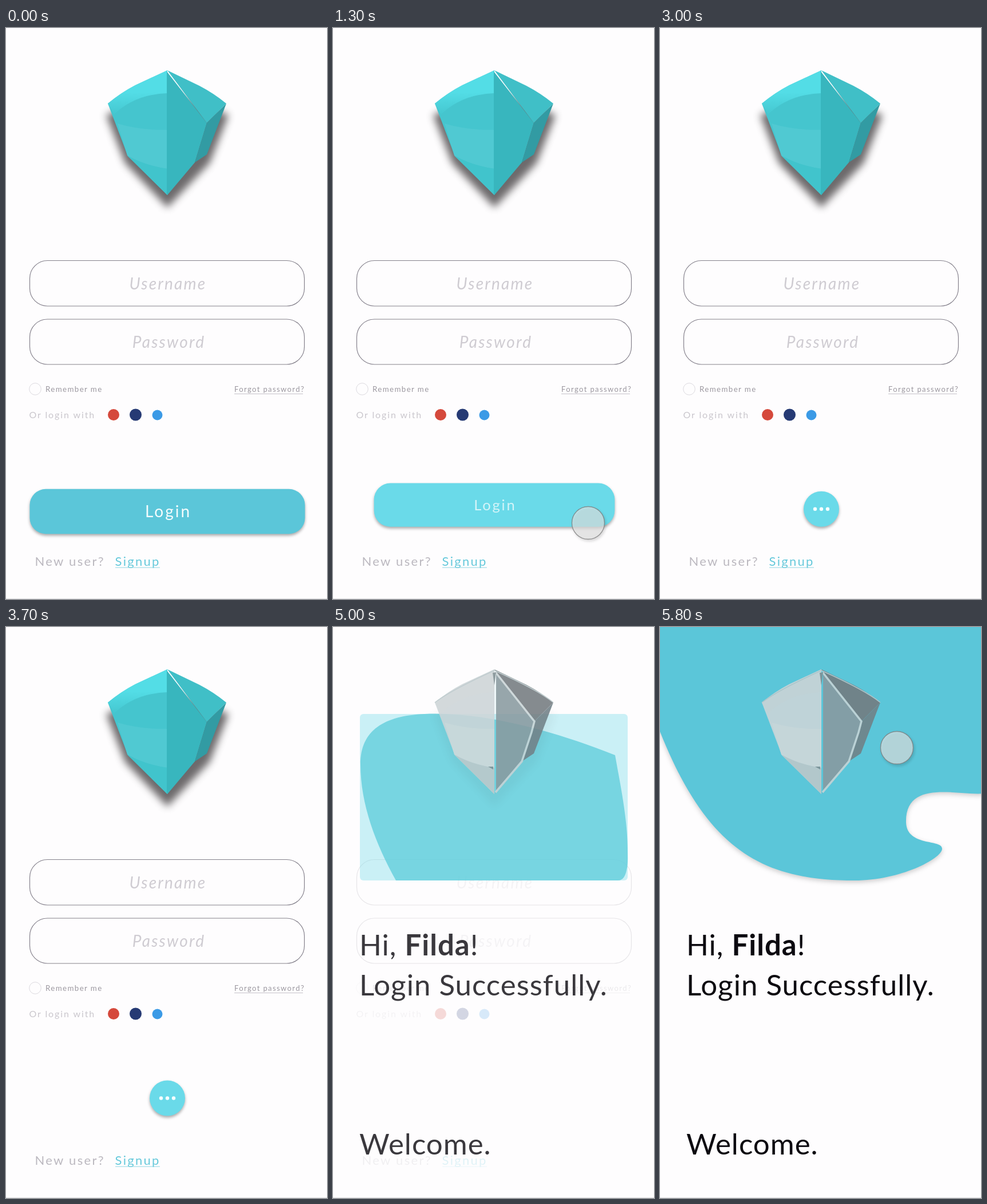
Recreate the animation shown at these times as an HTML page. Size 561 px wide and 998 px high, loop 5900 ms.

```html
<!DOCTYPE html>
<html lang="en">
<head>
<meta charset="utf-8">
<title>Login</title>
<style>
  html, body { margin: 0; width: 100%; height: 100%; overflow: hidden; background: #fefdfe; }
  svg { display: block; width: 100vw; height: 100vh; font-family: Lato, "Open Sans", sans-serif; }
  .field { fill: none; stroke: #85818c; stroke-width: 1.2; }
  .hint { font-size: 28px; font-style: italic; letter-spacing: 2.2px; fill: #cfccd2; text-anchor: middle; }
  .small { font-size: 13.3px; letter-spacing: 1.4px; fill: #9c98a0; }
  .foot { font-size: 22px; letter-spacing: 2.3px; fill: #bbb8bf; }
  .big { font-size: 51px; letter-spacing: 1px; fill: #0c0a10; }
</style>
</head>
<body>
<svg viewBox="0 0 561 998" preserveAspectRatio="none">
  <linearGradient id="crown" x2="0" y2="1">
    <stop offset=".5" stop-color="#53dde6"/><stop offset="1" stop-color="#45c7d0"/>
  </linearGradient>
  <path d="M0 997.5H561" stroke="#e3e2e4"/>
  <g id="form">
    <rect class="field" x="41.5" y="406.5" width="480" height="79.5" rx="31"/>
    <rect class="field" x="41.5" y="509" width="480" height="79" rx="31"/>
    <text class="hint" x="283" y="456.5">Username</text>
    <text class="hint" x="284.5" y="558.5">Password</text>
    <circle cx="51" cy="631" r="10.3" fill="none" stroke="#dddbe0"/>
    <text class="small" x="69" y="636">Remember me</text>
    <text class="small" x="399" y="636" style="font-size:13px">Forgot password?</text>
    <path d="M399 639.5H519" stroke="#c4c1c8"/>
    <text x="40.5" y="681.5" font-size="16" letter-spacing="1.9" fill="#cac7cd">Or login with</text>
    <circle cx="188" cy="676" r="10" fill="#d5493c"/>
    <circle cx="226.5" cy="676" r="10.5" fill="#263a74"/>
    <circle cx="264.5" cy="676.5" r="9" fill="#3b9ae6"/>
    <text class="foot" x="50.5" y="939.5">New user?</text>
    <text class="foot" x="190.5" y="939.5" style="fill:#66c9db">Signup</text>
    <path d="M191 943H269" stroke="#8ed6e2"/>
  </g>
  <rect id="button"/>
  <text id="label" font-size="28" letter-spacing="3" fill="#f4fcfd" text-anchor="middle" x="1.5" y="10">Login</text>
  <g id="dots" fill="#f6feff">
    <circle cx="-11" r="3.2"/><circle r="3.2"/><circle cx="11" r="3.2"/>
  </g>
  <path id="blob"/>
  <g id="gem">
    <path d="M175 152L208 236L282 314L356 236L389 152L282 110Z" fill="#2f2b2d" opacity=".7" style="filter:blur(7px)"/>
  </g>
  <g id="stone"></g>
  <g id="welcome">
    <text class="big" x="46" y="573.5">Hi, <tspan font-weight="700">Filda</tspan>!</text>
    <text class="big" x="46" y="643.5">Login Successfully.</text>
    <text class="big" x="46" y="921.5">Welcome.</text>
  </g>
  <circle id="touch" r="28.5" fill="#e6e6e6" fill-opacity=".65" stroke="#7d7d7d" stroke-opacity=".8"
    stroke-width="1.4" style="filter:drop-shadow(2px 3px 2px #0003)"/>
</svg>
<script>
const LOOP = 5900, $ = id => document.getElementById(id);
const clamp = v => Math.max(0, Math.min(1, v));
const span = (t, a, b) => clamp((t - a) / (b - a));
const mix = (a, b, k) => a + (b - a) * k;
const blend = (a, b, k) => `rgb(${a.map((v, i) => Math.round(mix(v, b[i], k)))})`;
const shadow = (y, blur, alpha) => `filter:drop-shadow(0 ${y}px ${blur}px rgba(0,0,0,${alpha}))`;
const inOut = u => u < .5 ? 2 * u * u : 1 - 2 * (1 - u) ** 2;
const out = u => 1 - (1 - u) ** 3;
const set = (id, attrs) => { for (const k in attrs) $(id).setAttribute(k, attrs[k]); };

const TEAL = [91, 198, 217], BRIGHT = [106, 218, 233], SOFT = [100, 207, 221];

// Facets: left side, its crown, band and foot; right side, its crown and edge
function drawGem(id, seam, colors) {
  const facets = [
    'M282 74L226 100Q201 113 178 132L213 224L282 292Z',
    'M282 74L226 100Q201 113 178 132L189 151Q225 116 282 114Z',
    'M195 167Q235 179 282 178V246Q244 241 212 223Z',
    'M212 223Q244 241 282 246V292Z',
    `M${seam} 76L351 166L330 235L282 292L${seam} 289Z`,
    'M282 74L338 101Q363 114 385 132L351 166Z',
    'M385 132L351 221L330 235L351 166Z'
  ];
  $(id).innerHTML += facets.map((d, i) => `<path d="${d}" fill="${colors[i]}"/>`).join('');
}
drawGem('gem', 281, ['#45c5ce', 'url(#crown)', '#50c9d2', '#41c4cc', '#38b6be', '#40bfc7', '#329ba3']);
drawGem('stone', 285, ['#ced5d8', '#cfd4d6', '#d5d9da', '#bfc8ca', '#89999f', '#747a7e', '#717f85']);
$('stone').innerHTML += `
  <path d="M284 79L352 165L347 184L330 235L284 289" fill="none" stroke="#c9d3d5" stroke-width="3.5"/>
  <path d="M178 132Q205 111 282 76Q360 111 385 132" fill="none" stroke="#b9c6c9" stroke-width="1.5"/>
  <path d="M279 80L285 79L282 102ZM271 244L280 244L280 249Z" fill="#808e92"/>`;

// Two closed outlines with matching cubic segments
const card = [160,152, 250,148,370,175,493,224, 501,270,515,335,515,390, 515,402,516,414,513,425,
  511,435,507,443,498,443, 370,443,240,443,110,443, 75,380,48,310,48,240, 48,180,90,155,160,152];
const wave = [-5,-5, 180,-5,380,-5,566,-5, 566,90,566,200,566,291, 520,295,428,265,430,342,
  432,385,495,370,493,388, 492,405,420,443,340,443, 180,443,80,392,-5,170, -5,100,-5,50,-5,-5];

function drawBlob(x, y, w, h, k, opacity) {
  const p = card.map((v, i) => mix(i % 2 ? y + (v - 152) / 291 * h : x + (v - 47) / 468 * w, wave[i], k));
  set('blob', { d: `M${p.slice(0, 2)}C${p.slice(2)}Z`, opacity,
    fill: blend(SOFT, TEAL, k), style: shadow(3, 4, .2 * k) });
}

function drawTouch(t) {
  let x, y, opacity;
  if (t < 2700) {
    const go = out(span(t, 150, 700)), leave = inOut(span(t, 2250, 2600));
    x = mix(517, 446, go) + 76 * leave;
    y = mix(890, 865, go);
    opacity = span(t, 120, 260) * (1 - span(t, 2450, 2650));
  } else {
    const go = out(span(t, 5450, 5800));
    x = mix(516, 414, go);
    y = mix(240, 211, go);
    opacity = span(t, 5430, 5560);
  }
  set('touch', { cx: x, cy: y, opacity });
}

function draw(t) {
  const shrink = inOut(span(t, 1140, 1740));
  const press = span(t, 850, 1200);
  const p = inOut(span(t, 4780, 5100));
  const grow = Math.min(1, p / .805);
  const bob = t < 1124 ? 845 : 835.5 + 12.5 * Math.cos((t - 2100) / 1100 * 2 * Math.PI);

  const w0 = mix(481, 62, shrink), h0 = mix(78.5, 62, shrink);
  const x = mix(282 - w0 / 2, 47, grow), y = mix(bob - h0 / 2, 152, grow);
  const w = mix(w0, 468, grow), h = mix(h0, 291, grow);
  set('button', { x, y, width: w, height: h, rx: mix(mix(28, 31, shrink), 6, grow),
    fill: blend(TEAL, BRIGHT, press), opacity: Math.min(1, 1.8 * (1 - p)),
    style: shadow(3, 2.5, .33 * (1 - grow)) });
  set('label', { transform: `translate(282 ${bob}) scale(${1 - shrink * .6})`, opacity: clamp(1 - shrink * 1.6) });
  set('dots', { transform: `translate(282 ${bob})`, opacity: span(t, 1620, 1780) * clamp(1 - p * 3) });

  drawBlob(x, y, w, h, inOut(span(t, 5000, 5400)), p);
  set('form', { opacity: 1 - p });
  set('gem', { opacity: clamp(1 - p * 1.15) });
  set('stone', { opacity: clamp(p * 1.22) * .87 });
  set('welcome', { opacity: p });
  drawTouch(t);
}

function tick() {
  draw(performance.now() % LOOP);
  requestAnimationFrame(tick);
}
tick();
</script>
</body>
</html>
```
